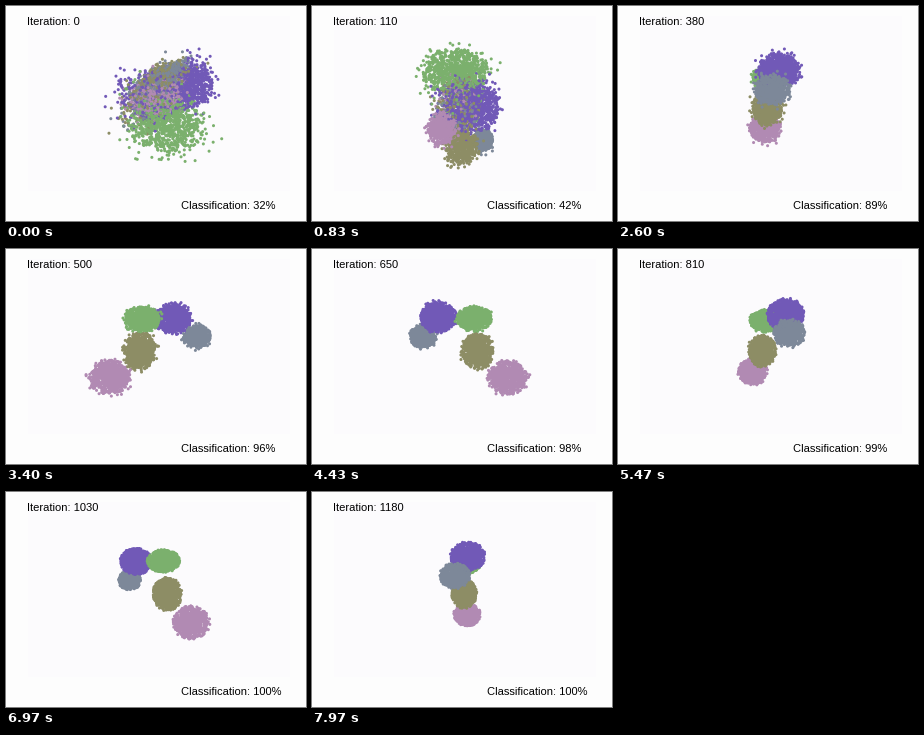
Write a matplotlib script that moves like this. It is 300 px wide and 215 px high and loops after 8 s.

```python
import numpy as np
import matplotlib.pyplot as plt
from matplotlib.animation import FuncAnimation
from matplotlib.colors import to_rgba
from matplotlib.patches import Rectangle

W, H, DPI = 300, 215, 100
FRAMES, INTERVAL = 250, 32          # 8 s loop
STEPS = 240                         # simulation steps per loop
SPIN = np.radians(4.4)              # turn per step about the vertical axis
CX, CY, CAM = 150, 100, 260         # view centre and camera distance
MID, SETTLED = 25, 55               # steps at which the clusters split and settle

rng = np.random.default_rng(7)


def turn(x, z, angle):
    c, s = np.cos(angle), np.sin(angle)
    return x * c + z * s, z * c - x * s


def seen(step, x, y, z, rx, ry):
    """World state (x, y, z, rx, ry) of an ellipsoid seen at a screen place."""
    x, z = turn(x - CX, z, -SPIN * step)
    return x, y - CY, z, rx, ry


def orbit(phase, radius, y, rx, ry):
    """World state of a settled cluster circling the axis."""
    a = np.radians(phase)
    return radius * np.sin(a), y, radius * np.cos(a), rx, ry


class Cluster:
    """Points that gather from a tilted cloud; a few start in a shared haze."""

    def __init__(self, color, n, haze, start, mid, home, tilt=0.0):
        self.color, self.n, self.tilt = color, n, tilt
        home = orbit(*home)
        self.main = np.array([seen(0, *start), seen(MID, *mid), home]).T
        self.haze = np.array([seen(0, 147, 90, 4, 35, 24),
                              seen(MID, 146, 101, 4, 21, 27), home]).T
        self.in_haze = rng.random(n) < haze
        d = rng.normal(size=(3, n))
        self.dir = d / np.linalg.norm(d, axis=0)
        self.core = rng.random(n) ** 0.4
        self.stray = np.minimum(rng.exponential(size=n), 3) ** 2 / 2

    def points(self, k):
        main, haze = ([np.interp(k, [0, MID, SETTLED], row) for row in path]
                      for path in (self.main, self.haze))
        x, y, z, rx, ry = (np.where(self.in_haze, h, m) for m, h in zip(main, haze))
        size = 1.05 - 0.2 * k / STEPS
        tail = 0.12 * max(0, 1 - k / 200)
        dx, dy, dz = self.dir * self.core * (1 + tail * self.stray) * size
        slope = self.tilt * max(0, 1 - k / MID)
        return np.array([x + rx * dx, y + ry * dy - slope * rx * dx, z + rx * dz])


clusters = [
    Cluster("#7159b7", 1050, 0.36, (185, 78, 0, 20, 23), (168, 101, -2, 19, 25),
            (41, 24, -32, 19, 16)),
    Cluster("#7bb06d", 950, 0.06, (160, 119, 6, 36, 25), (143, 64, 0, 32, 22),
            (191, 14, -29.5, 18, 12.5)),
    Cluster("#7d8899", 680, 0.12, (153, 77, 0, 27, 14), (172, 138, -16, 9, 11),
            (21, 46, -13.3, 15, 12.5), tilt=0.6),
    Cluster("#8d8d65", 800, 0.24, (150, 77, 2, 20, 14), (150, 142, 8, 15, 17),
            (201, 16.5, 2, 16, 18.5), tilt=0.5),
    Cluster("#b18ab3", 780, 0.10, (152, 92, -2, 27, 17), (132, 123, 18, 12, 14),
            (201, 46, 26.5, 19, 16.5), tilt=0.2),
]
colors = np.concatenate([np.tile(to_rgba(c.color), (c.n, 1)) for c in clusters])


def project(x, y, z, k):
    x, z = turn(x, z, SPIN * k)
    scale = CAM / (CAM - z)
    return CX + x * scale, CY + y * scale, z


def score(k):
    return int(np.interp(k, [0, 24, 55, 102, 122, 158, 204],
                         [32, 42, 84, 96, 98, 99, 100]) + 0.01)


fig = plt.figure(figsize=(W / DPI, H / DPI), dpi=DPI, facecolor="#fdfdfd")
ax = fig.add_axes([0, 0, 1, 1])
ax.set_xlim(0, W)
ax.set_ylim(H, 0)
ax.axis("off")
ax.add_patch(Rectangle((22, 10), 262, 175, fc="#fcfbfd", lw=0))

dots = ax.scatter(np.zeros(len(colors)), np.zeros(len(colors)), s=4.8, lw=0)
font = dict(family="Liberation Sans", size=11.1 * 72 / DPI, color="black",
            va="baseline")
step_text = ax.text(21, 19, "", **font)
score_text = ax.text(175, 203, "", **font)


def draw(i):
    k = int(i * STEPS / FRAMES + 0.9)
    cloud = np.concatenate([c.points(k) for c in clusters], axis=1)
    x, y, z = project(*cloud, k)
    order = np.argsort(z)
    dots.set_offsets(np.column_stack([x, y])[order])
    dots.set_facecolors(colors[order])
    step_text.set_text(f"Iteration: {max(0, (k - 2) // 2 * 10)}")
    score_text.set_text(f"Classification: {score(k)}%")
    return dots, step_text, score_text


anim = FuncAnimation(fig, draw, frames=FRAMES, interval=INTERVAL, repeat=True,
                     repeat_delay=0, blit=False)
plt.show()
```
